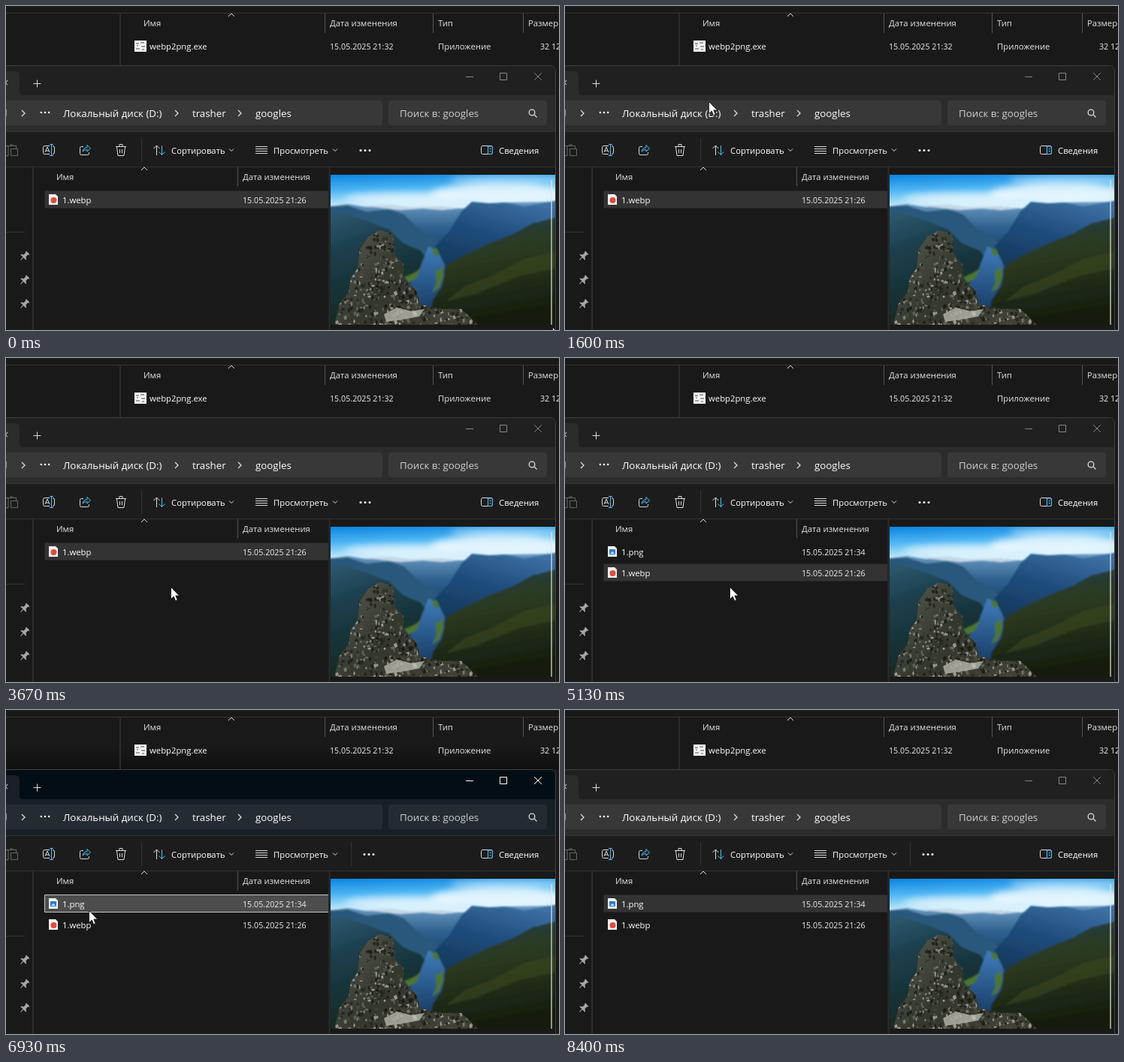
Write an HTML page that moves like this. It is 736 px wide and 432 px high and loops after 8470 ms.

```html
<!DOCTYPE html>
<html lang="ru">
<head>
<meta charset="utf-8">
<title>webp2png</title>
<style>
  html, body { margin: 0; width: 100%; height: 100%; overflow: hidden; background: #191919; }
  svg { display: block; width: 100vw; height: 100vh; }
  text { font: 11.3px "Open Sans", "Noto Sans", sans-serif; fill: #fff; white-space: pre; }
  .head { fill: #e4e4e4; }
  .date { font-size: 10.7px; fill: #eee; }
  .path { font-size: 13.3px; }
  .line { fill: none; stroke: #ddd; }
  .blue { fill: none; stroke: #4cc2ff; }
  .dim { fill: none; stroke: #868686; }
  .bright { fill: none; stroke: #fff; }
  .rule { fill: none; stroke: #555; }
  .faint { fill: none; stroke: #333; }
  .active { opacity: var(--active, 0); }
</style>
</head>
<body>
<svg viewBox="0 0 736 432">
  <defs>
    <linearGradient id="shade" x2="0" y2="1">
      <stop stop-opacity="0"/><stop offset="1" stop-opacity=".4"/>
    </linearGradient>
    <linearGradient id="sky" x1=".1" x2=".3" y2="1">
      <stop stop-color="#0e86e2"/><stop offset=".4" stop-color="#4fb6f2"/><stop offset=".8" stop-color="#c9ecfb"/><stop offset="1" stop-color="#e6f5fb"/>
    </linearGradient>
    <linearGradient id="far" x2="0" y2="1">
      <stop stop-color="#6d9cc4"/><stop offset=".5" stop-color="#2f628f"/><stop offset="1" stop-color="#173f66"/>
    </linearGradient>
    <linearGradient id="peak" x1=".7" x2=".2" y2="1">
      <stop stop-color="#3c70a3"/><stop offset=".45" stop-color="#1f4d7c"/><stop offset="1" stop-color="#123457"/>
    </linearGradient>
    <linearGradient id="left" x2=".3" y2="1">
      <stop stop-color="#2f5c74"/><stop offset=".35" stop-color="#1c3f4d"/><stop offset="1" stop-color="#14261f"/>
    </linearGradient>
    <linearGradient id="right" x2=".2" y2="1">
      <stop stop-color="#1f3d49"/><stop offset=".4" stop-color="#2c3b22"/><stop offset="1" stop-color="#141c0d"/>
    </linearGradient>
    <linearGradient id="lake" x2="0" y2="1">
      <stop stop-color="#3f7cb8"/><stop offset="1" stop-color="#163a62"/>
    </linearGradient>
    <linearGradient id="rock" x2="1" y2=".5">
      <stop stop-color="#5b5d52"/><stop offset=".5" stop-color="#34372e"/><stop offset="1" stop-color="#3f4036"/>
    </linearGradient>
    <filter id="cloudy"><feGaussianBlur stdDeviation="5"/></filter>
    <filter id="soft"><feGaussianBlur stdDeviation="1.2"/></filter>
    <clipPath id="frame"><path d="M432 225H731V425H432Z"/></clipPath>
    <clipPath id="crag"><path id="cragShape" d="M437 425L444 397 456 382 459 362 468 350 471 324 482 308 497 299 515 303 517 330 529 344 531 367 545 377 552 398 580 404 606 404 628 425Z"/></clipPath>
    <path id="down" d="M-3-1.5L0 1.5 3-1.5"/>
    <path id="next" d="M-2-4L2 0-2 4"/>
    <path id="up" d="M-4 2L0-2 4 2"/>
    <g id="dots"><circle cx="-6" r="1.5"/><circle r="1.5"/><circle cx="6" r="1.5"/></g>
    <path id="page" d="M57 5H66L69 8V19H57Z" fill="#f4f4f4"/>
    <g id="pin" transform="rotate(45)" fill="#a5a8ab">
      <path d="M-3-6H3V-4H2V0L5 2V3H-5V2L-2 0V-4H-3ZM-.5 3H.5V8H-.5Z"/>
    </g>
  </defs>

  <rect width="736" height="432" fill="#191919"/>
  <rect class="active" y="49" width="736" height="30" fill="url(#shade)"/>
  <path class="faint" d="M0 9.5H736"/>
  <path d="M151 10H153V79H151Z" fill="#2b2b2b"/>
  <path class="rule" d="M424.5 10V36M568.5 10V36M688.5 10V36"/>
  <use href="#up" class="line" x="300" y="12"/>
  <rect id="appRow" x="167" y="41" width="569" height="24" fill="#4d4d4d"/>
  <rect x="171" y="46" width="16" height="15" fill="#f2f2f2"/>
  <path d="M173 50H177M179 49H184M174 53H176M180 54H185M173 57H178M181 58H184" stroke="#555"/>
  <text class="head" x="183" y="27">Имя</text>
  <text class="head" x="431" y="27">Дата изменения</text>
  <text class="head" x="575" y="27">Тип</text>
  <text class="head" x="695" y="27">Размер</text>
  <text x="191" y="58">webp2png.exe</text>
  <text class="date" x="431" y="58">15.05.2025 21:32</text>
  <text class="head" x="575" y="58">Приложение</text>
  <text class="date" x="711" y="58">32 128 КБ</text>

  <!-- Explorer window -->
  <path d="M-2 79.5H724Q731.5 79.5 731.5 88V434H-2Z" fill="#191919" stroke="#414141"/>
  <path d="M0 80H724Q731 80 731 88V119H0Z" fill="#202020"/>
  <path d="M0 87H12Q18 87 18 93V114Q18 119 23 119H731V167H0Z" fill="#2c2c2c"/>
  <g class="active">
    <path d="M0 80H724Q731 80 731 88V119H0Z" fill="#020d15"/>
    <path d="M0 87H12Q18 87 18 93V114Q18 119 23 119H731V167H0Z" fill="#182025"/>
  </g>
  <path d="M0 126H497Q501 126 501 130V155Q501 159 497 159H0Z" fill="#fff" fill-opacity=".055"/>
  <rect x="509" y="126" width="211" height="33" rx="4" fill="#fff" fill-opacity=".055"/>
  <path d="M0 168H731V214H0Z" fill="#1c1c1c"/>
  <path class="faint" d="M0 167.5H731M0 214.5H731"/>
  <path class="line" d="M-4 99L2 105M-4 107L2 99M36.5 103.5H46.5M41.5 98.5V108.5M0 138V147"/>
  <path id="buttons" d="M612 94.5H622M657.5 89.5H666.5V98.5H657.5ZM703 89L713 99M713 89L703 99" class="dim"/>
  <path d="M612 94.5H622M657.5 89.5H666.5V98.5H657.5ZM703 89L713 99M713 89L703 99" class="bright active"/>
  <g class="line" stroke-width="1.3">
    <use href="#next" x="23" y="143"/><use href="#next" x="227" y="143"/><use href="#next" x="311" y="143"/>
    <circle cx="700" cy="142" r="3.8"/><path d="M703 145L706.5 148.5"/>
  </g>
  <use href="#dots" fill="#fff" transform="translate(52 142) scale(.85)"/>
  <text class="path" x="76" y="148">Локальный диск (D:)</text>
  <text class="path" x="248" y="148">trasher</text>
  <text class="path" x="332" y="148">googles</text>
  <text class="path" x="524" y="148" style="fill:#cfcfcf">Поиск в: googles</text>

  <!-- Toolbar -->
  <path class="dim" opacity=".7" d="M0 186.5H3V199.5H0M3 186.5H13.5V190M5 185H10M6.500 190.5H15.5V199.5H6.500Z"/>
  <path class="line" d="M58 186.5H51.5Q49.5 186.5 49.5 188.5V195.5Q49.5 197.5 51.5 197.5H58M62 186.5Q64.5 186.5 64.5 189V195Q64.5 197.5 62 197.5M52 195L55 188 58 195M53 193H57"/>
  <path class="blue" d="M60.5 184.5V199.5M58 184.5H63M58 199.5H63"/>
  <path class="line" d="M103 187.5H100.5Q98.5 187.5 98.5 189.5V196.5Q98.5 198.5 100.5 198.5H108.5Q110.5 198.5 110.5 196.5V195"/>
  <path class="blue" d="M102 194Q103 189 108 188.5V185.5L112.5 190 108 194V191.5Q104 191.5 102 194Z"/>
  <path class="line" d="M146 187.5H160M151 187V184.5H155V187M147.5 188L149 199.5H157L158.5 188M151.5 191V196M154.5 191V196"/>
  <path class="faint" d="M180.5 176V208"/>
  <path class="line" d="M200.5 199V186M196.5 190L200.5 186 204.5 190"/>
  <path class="blue" d="M207.5 186V198M203.5 194.5L207.5 198.5 211.5 194.5"/>
  <path class="line" d="M332 187.5H348M332 190.5H348M332 193.5H348M332 196.5H348"/>
  <use href="#down" class="line" x="300" y="192"/><use href="#down" class="line" x="438" y="192"/>
  <path id="moreRule" class="faint" d="M459.5 176V208"/>
  <use id="more" href="#dots" fill="#fff"/>
  <rect class="line" x="632.5" y="186.5" width="15" height="11" rx="2"/>
  <path class="blue" d="M641.5 187H645.5Q647.5 187 647.5 189V195Q647.5 197.5 645.5 197.5H641.5ZM643.5 190.5H646M643.5 193.5H646"/>
  <text x="220" y="197">Сортировать</text>
  <text x="356" y="197">Просмотреть</text>
  <text x="656" y="197">Сведения</text>

  <!-- File list -->
  <path d="M35 215H37V432H35ZM429.5 215H431.5V432H429.5Z" fill="#2d2d2d"/>
  <path class="faint" d="M0 301.5H25"/>
  <use href="#pin" transform="translate(25 333)"/>
  <use href="#pin" transform="translate(25 365)"/>
  <use href="#pin" transform="translate(25 397)"/>
  <use href="#up" class="line" x="184" y="217"/>
  <path class="rule" d="M308.5 215V240"/>
  <text class="head" x="67" y="232">Имя</text>
  <text class="head" x="315" y="232">Дата изменения</text>
  <g id="png">
    <path class="bar" d="M429 .5H51.5V23.5H429"/>
    <use href="#page"/><path d="M59 9H67V16H59Z" fill="#2b7cd3"/><path d="M60 15L63 12 66 15Z" fill="#cfe6fa"/>
    <text x="75" y="17">1.png</text><text class="date" x="315" y="17">15.05.2025 21:34</text>
  </g>
  <g id="webp">
    <path class="bar" d="M429 .5H51.5V23.5H429"/>
    <use href="#page"/><circle cx="63.5" cy="13" r="4" fill="#dc4d3f"/>
    <text x="75" y="17">1.webp</text><text class="date" x="315" y="17">15.05.2025 21:26</text>
  </g>

  <!-- Preview -->
  <g clip-path="url(#frame)">
    <rect x="432" y="225" width="299" height="50" fill="url(#sky)"/>
    <g filter="url(#cloudy)" fill="#effaff">
      <ellipse cx="655" cy="250" rx="90" ry="13" opacity=".85"/>
      <ellipse cx="530" cy="257" rx="80" ry="8" opacity=".7"/>
      <ellipse cx="670" cy="232" rx="80" ry="7" opacity=".45"/>
    </g>
    <g filter="url(#soft)">
      <path d="M425 268L455 264 480 268 510 265 540 270 575 267 606 270 660 262 740 261V330H425Z" fill="url(#far)"/>
      <path d="M470 266L510 265 540 268 575 267 604 270 580 272 555 270 525 272Z" fill="#c4d9e8"/>
      <path d="M425 268L455 266 480 274 510 271 530 278 548 296 570 308 584 322 560 345 425 350Z" fill="#2b587c"/>
      <path d="M568 324L590 300 606 274 620 261 643 263 665 262 690 267 740 258V345L590 360Z" fill="url(#peak)"/>
      <path d="M425 272L462 280 490 290 510 298 528 316 552 326 562 340 545 368 520 395 425 430Z" fill="url(#left)"/>
      <path d="M562 321L574 325 584 346 582 380 566 410 520 400 538 370 550 352Z" fill="url(#lake)"/>
      <path d="M740 280L700 290 675 304 640 318 606 334 586 346 580 374 568 392 562 430H740Z" fill="url(#right)"/>
      <path d="M740 326L690 337 650 358 610 374 585 394 625 384 680 361 740 348Z" fill="#3f4c22" opacity=".5"/>
      <path d="M530 362L545 355 552 350 547 362 536 369ZM566 326L573 322 577 333 570 332ZM572 354L581 348 582 362 576 376 567 382 573 369Z" fill="#4d7533"/>
    </g>
    <use href="#cragShape" fill="url(#rock)"/>
    <g id="stones" clip-path="url(#crag)" opacity=".75"></g>
    <path d="M503 411L520 402 540 407 557 404 550 414 528 418 506 421Z" fill="#c9c8bd" opacity=".7"/>
  </g>
  <path d="M725 232H727V425H725Z" fill="#e4e8e6" opacity=".6"/>

  <g id="cursor">
    <path d="M.5 .5V16.5L4.200 13 6.600 18.7 9.200 17.6 6.800 12H11.7Z" fill="#fff" stroke="#111" stroke-width=".8"/>
    <circle id="busy" cx="13.5" r="6" fill="none" stroke="#2f95df" stroke-width="3.5"/>
  </g>
</svg>
<script>
const $ = id => document.getElementById(id);
const LOOP = 8470, TICK = 1000 / 15;

// Cursor stops: tick, x, y
const stops = [
  [3, 727, 428], [16, 96, 264], [29, 238, 59], [36, 238, 59], [48, 217, 305],
  [53, 217, 305], [55, 219, 305], [85, 219, 305], [90, 70, 440], [92, 70, 440],
  [93, 97, 349], [104, 110, 267], [105, 110, 267], [118, 715, 436], [119, 727, 450]
];
const clamp = v => Math.max(0, Math.min(1, v));
const smooth = v => v * v * (3 - 2 * v);

function cursorAt(tick) {
  const i = stops.findIndex(s => s[0] >= tick);
  if (i === 0) return stops[0].slice(1);
  if (i < 0) return stops.at(-1).slice(1);
  const [t0, x0, y0] = stops[i - 1], [t1, x1, y1] = stops[i];
  const k = smooth((tick - t0) / (t1 - t0));
  return [Math.round(x0 + (x1 - x0) * k), Math.round(y0 + (y1 - y0) * k)];
}

function styleRow(id, y, selected, active, [cx, cy]) {
  const hover = cx >= 51 && cx < 429 && cy >= y && cy < y + 24;
  const bar = $(id).querySelector(".bar");
  $(id).setAttribute("transform", `translate(0 ${y})`);
  bar.setAttribute("fill", hover || (selected && active) ? "#4d4d4d" : selected ? "#333" : "none");
  bar.setAttribute("stroke", hover && selected ? "#c8c8c8" : "none");
}

const show = (id, visible) => { $(id).style.display = visible ? "" : "none"; };

function render(ms) {
  const tick = Math.floor(ms / TICK + 0.1);
  const pos = cursorAt(tick), [x, y] = pos;
  const converted = tick >= 77, picked = tick >= 101;
  const active = clamp((tick - 100) / 3) * clamp((124 - tick) / 3);

  document.documentElement.style.setProperty("--active", active);
  $("cursor").setAttribute("transform", `translate(${x} ${y})`);
  $("more").setAttribute("transform", `translate(${picked ? 483 : 478} 192.5)`);
  show("busy", tick >= 31 && tick < 42);
  show("appRow", x >= 167 && y >= 41 && y < 65);
  show("png", converted);
  show("moreRule", picked);
  styleRow("png", 246, picked, active > 0, pos);
  styleRow("webp", converted ? 274 : 246, !picked, false, pos);
}

// Speckled rock texture
let seed = 7;
const rand = () => (seed = seed * 16807 % 2147483647) / 2147483647;
const tones = ["#8d8d82", "#6a6b60", "#12140e", "#1a1c14", "#24261d", "#4d4f43", "#b9b8ae"];
$("stones").innerHTML = Array.from({ length: 900 }, () => {
  const x = 437 + rand() * 190, y = 299 + rand() * 126, w = 1 + rand() * 3, h = 1 + rand() * 4;
  return `<path d="M${x} ${y}l${w} ${-h / 2} ${w / 2} ${h} ${-w} ${h / 2}z" fill="${tones[Math.floor(rand() * tones.length)]}"/>`;
}).join("");

const start = performance.now();
function loop() {
  render((performance.now() - start) % LOOP);
  requestAnimationFrame(loop);
}
loop();
</script>
</body>
</html>
```
